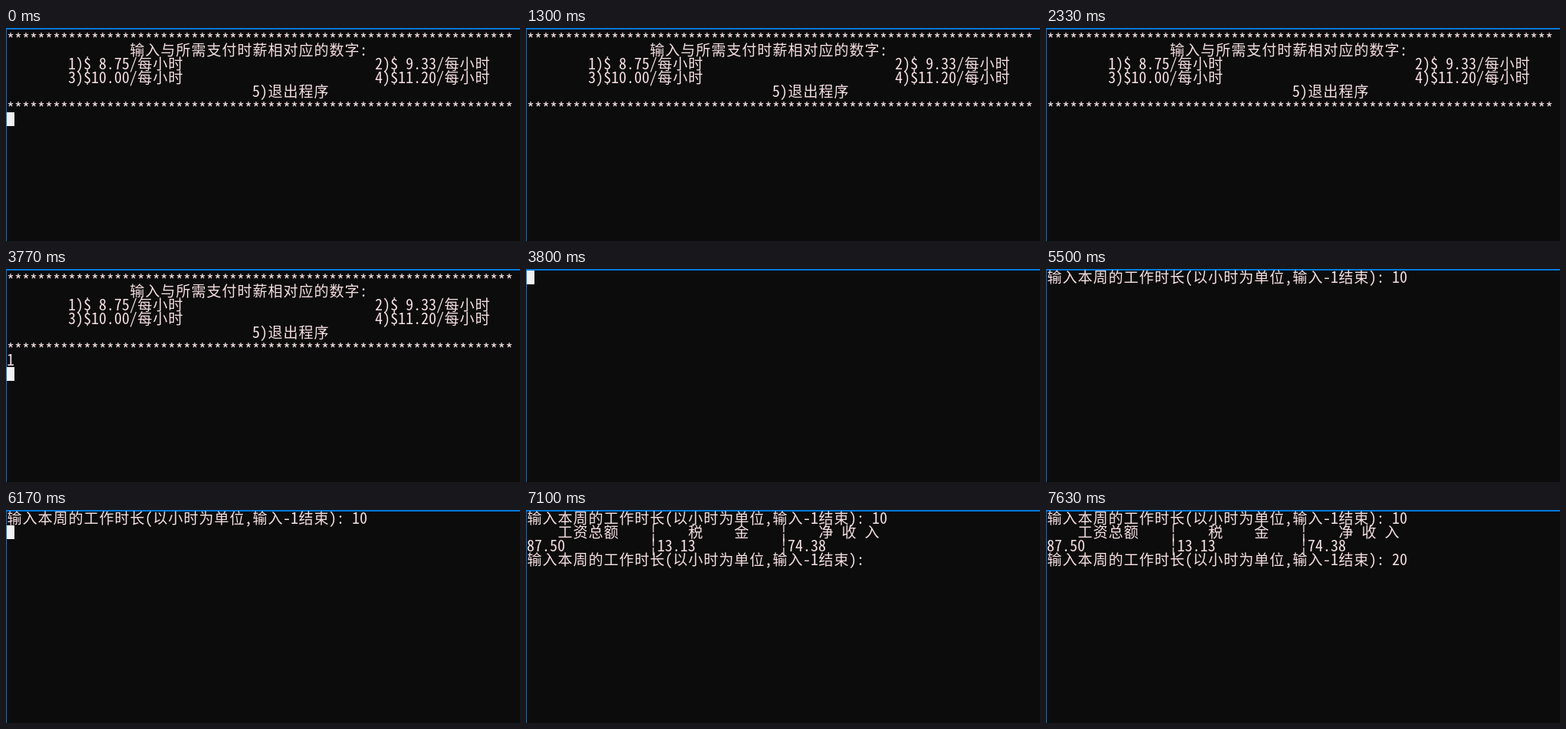
An HTML page with a canvas that plays this animation: 670x278 px, repeating every 8 s.

```html
<!DOCTYPE html>
<html lang="zh-CN">
<meta charset="utf-8">
<style>
  html, body { margin: 0; height: 100%; overflow: hidden; background: #0c0c0c; }
  canvas { display: block; }
</style>
<canvas id="stage" width="670" height="278"></canvas>
<script>
const ctx = document.getElementById('stage').getContext('2d');
const CELL_W = 10, CELL_H = 18, LEFT = 1, TOP = 2, LOOP = 8000;
const LATIN = '20px "Noto Sans Mono CJK SC", "Noto Sans CJK SC", monospace';
const HAN = '300 19px "Noto Sans CJK SC", "Noto Sans Mono CJK SC", sans-serif';

const pad = n => ' '.repeat(n);
const stars = '*'.repeat(66);
const menu = [
  stars,
  pad(16) + '输入与所需支付时薪相对应的数字:',
  pad(8) + '1)$ 8.75/每小时' + pad(25) + '2)$ 9.33/每小时',
  pad(8) + '3)$10.00/每小时' + pad(25) + '4)$11.20/每小时',
  pad(32) + '5)退出程序',
  stars
];
const prompt = '输入本周的工作时长(以小时为单位,输入-1结束): ';
const report = [
  prompt + '10',
  pad(4) + '工资总额' + pad(4) + '¦' + pad(4) + '税' + pad(4) + '金' + pad(4) + '¦' + pad(4) + '净 收 入',
  '87.50' + pad(11) + '¦13.13' + pad(11) + '¦74.38'
];
const chosen = [...menu, '1'];

// Each step: start time, lines on screen, cursor [column, row] if visible
const steps = [
  [0, menu, [0, 6]],
  [200, menu],
  [730, menu, [0, 6]],
  [1300, menu],
  [1800, menu, [0, 6]],
  [2330, menu],
  [2570, chosen, [1, 6]],
  [2870, chosen],
  [3400, chosen, [1, 6]],
  [3770, chosen, [0, 7]],
  [3800, [], [0, 0]],
  [3830, [prompt], [45, 0]],
  [4470, [prompt]],
  [5000, [prompt], [45, 0]],
  [5100, [prompt + '1'], [46, 0]],
  [5470, [prompt + '10'], [47, 0]],
  [5500, [prompt + '10']],
  [6030, [prompt + '10'], [47, 0]],
  [6170, [prompt + '10'], [0, 1]],
  [6200, [...report, prompt], [45, 3]],
  [7100, [...report, prompt]],
  [7230, [...report, prompt + '2'], [46, 3]],
  [7600, [...report, prompt + '20'], [47, 3]],
  [7630, [...report, prompt + '20']]
];

function drawLine(line, row) {
  let col = 0;
  for (const ch of line) {
    const wide = ch > '\u2fff', span = wide ? 2 : 1;
    const drop = ch === '*' ? 4 : 0;
    ctx.font = wide ? HAN : LATIN;
    ctx.fillText(ch, LEFT + (col + span / 2) * CELL_W, TOP + row * CELL_H + 16 + drop);
    col += span;
  }
}

function draw([, lines, cursor]) {
  ctx.fillStyle = '#0c0c0c';
  ctx.fillRect(0, 0, 670, 278);
  ctx.fillStyle = '#0078d7';
  ctx.fillRect(0, 0, 670, TOP);
  ctx.fillRect(0, 0, LEFT, 278);
  ctx.fillStyle = '#f6dfe2';
  ctx.textAlign = 'center';
  lines.forEach(drawLine);
  if (cursor) {
    ctx.fillStyle = '#f2f2f2';
    ctx.fillRect(LEFT + cursor[0] * CELL_W, TOP + cursor[1] * CELL_H, CELL_W, CELL_H);
  }
}

function tick() {
  const t = performance.now() % LOOP;
  draw(steps.findLast(step => step[0] <= t));
  requestAnimationFrame(tick);
}
tick();
</script>
</html>
```
